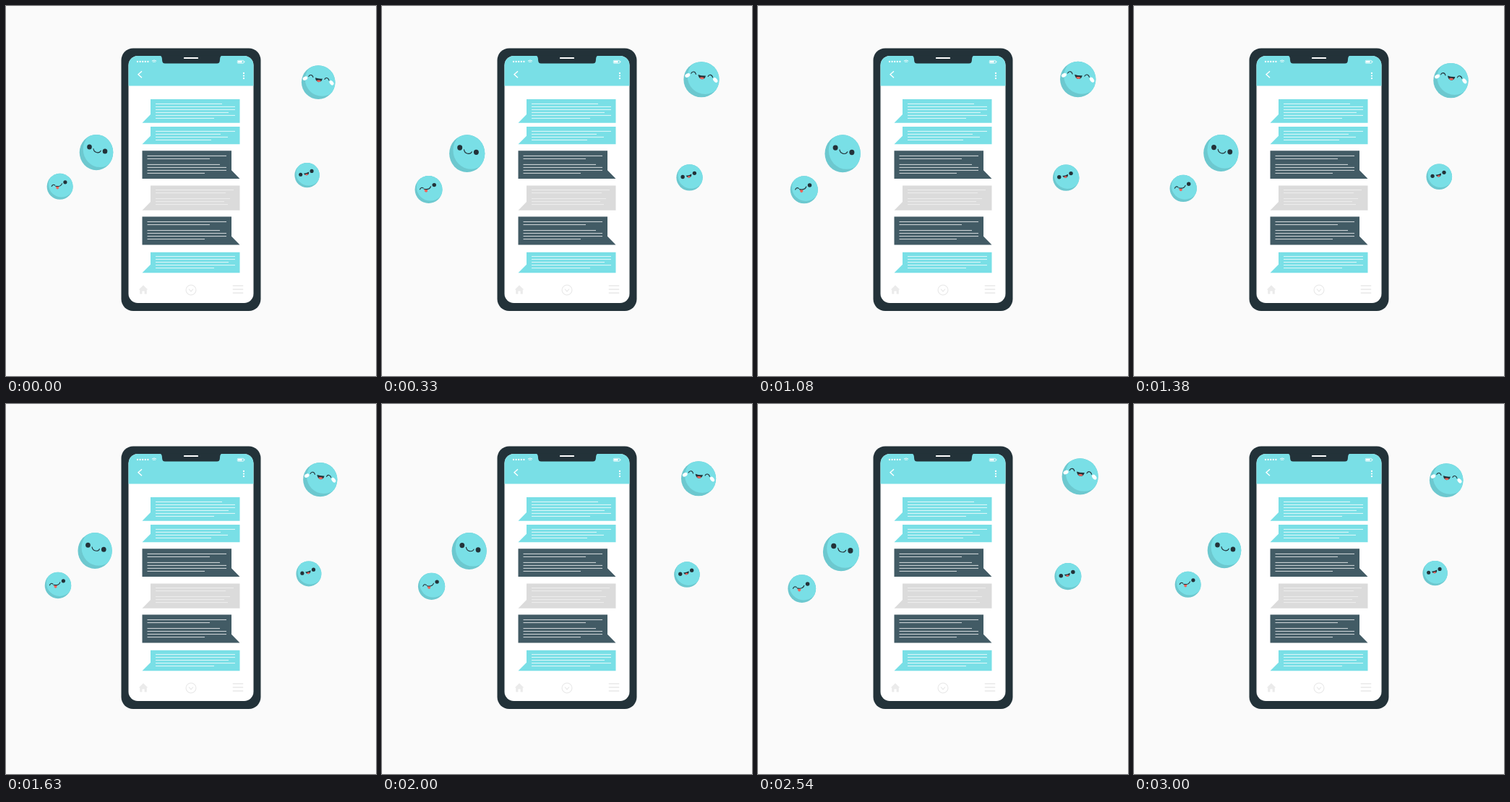
Recreate the animation shown at these times as an HTML page. Size 512 by 512 pixels, loop 3040 ms.

```html
<!DOCTYPE html>
<html lang="en">
<head>
<meta charset="utf-8">
<title>Chat reactions</title>
<style>
  html, body { margin: 0; width: 100%; height: 100%; overflow: hidden; background: #fafafa; }
  svg { display: block; width: 100vw; height: 100vh; }
  .cyan { fill: #79dfe6; }
  .shade { fill: #6cc8cf; }
  .dark { fill: #233239; }
  .slate { fill: #425b65; }
  .gray { fill: #dbdbdb; }
  .white { fill: #fff; }
  .red { fill: #f0655c; }
  .pen { fill: none; stroke: #233239; stroke-width: 1.05; stroke-linecap: round; }
  .icon { fill: none; stroke: #ebebeb; stroke-width: 1.3; }
</style>
</head>
<body>
<svg viewBox="0 0 512 512">
  <defs><clipPath id="screen"><rect x="169.5" y="69" width="173" height="342" rx="13"/></clipPath></defs>
  <rect class="dark" x="159.5" y="58.5" width="193" height="363.5" rx="16.5"/>
  <g clip-path="url(#screen)">
    <rect class="white" x="169" y="69" width="174" height="342"/>
    <rect class="cyan" x="169" y="69" width="174" height="41.5"/>
  </g>
  <path class="dark" d="M213 68.5Q215.6 69 215.8 72L216.2 76Q216.6 79.6 220 79.6H292Q295.4 79.6 295.8 76L296.2 72Q296.4 69 299 68.5Z"/>
  <rect class="white" x="246" y="71" width="20" height="2.1" rx=".6"/>
  <g id="dots" class="white"></g>
  <g fill="none" stroke="#fff">
    <path d="M201.9 76.2Q205 73.6 208.1 76.2M203.3 77.6Q205 76.2 206.7 77.6" stroke-width=".9"/>
    <path d="M188 90.2L183 94.7L188 99.2" stroke-width="1.4"/>
    <rect x="320.3" y="75.3" width="8.6" height="4" rx=".8" stroke-width=".7"/>
  </g>
  <path class="white" d="M321 76h5.6v2.6H321zM329.3 76.3h1v2h-1z"/>
  <g id="chat"></g>
  <path d="M190 386.2L196.3 392.4H194.8V398.6H191.6V394.6H188.4V398.6H185.2V392.4H183.7Z" fill="#ebebeb"/>
  <g class="icon">
    <circle cx="256" cy="393" r="6.9"/>
    <path d="M253 391.6L256 395L259 391.6"/>
    <path d="M313.8 387.2H328.2M313.8 392.2H328.2M313.8 397.2H328.2" stroke-width="1.7"/>
  </g>
  <g id="faces">
    <g id="happy">
      <ellipse class="dark" cx="115.5" cy="194.9" rx="3.3" ry="3.5"/>
      <ellipse class="dark" cx="137" cy="200.9" rx="3.3" ry="3.5"/>
      <path class="pen" d="M121 197.6C121.8 203.4 129.3 204.5 131.2 200.3"/>
    </g>
    <g id="wink">
      <circle class="dark" cx="81.9" cy="243.8" r="2.6"/>
      <path class="red" d="M69 249.8L73 249.6Q74 252.6 71.6 253.5Q69.2 253.6 69 249.8Z"/>
      <path class="pen" d="M63.2 249.6Q64.6 246 67.6 248M68.6 249.2Q75.8 250.6 77.4 245.8"/>
    </g>
    <g id="laugh">
      <path class="pen" d="M418.8 97.6C420 94.6 424 94.6 425 98.6M440.9 101.5C442.2 98.3 446.2 99 447 102.8"/>
      <ellipse class="white" cx="414" cy="100.2" rx="3.5" ry="2.4" transform="rotate(-28 414 100.2)"/>
      <ellipse class="white" cx="450.5" cy="106.3" rx="3.7" ry="2.4" transform="rotate(52 450.5 106.3)"/>
      <path class="dark" d="M427.9 99.2Q433 101 437.9 100.6Q437 105.2 432.6 105.2Q428.6 104.4 427.9 99.2Z"/>
      <path class="red" d="M429.6 103Q433 101.6 436 103.6Q434.8 105.3 432.6 105.2Q430.6 104.8 429.6 103Z"/>
    </g>
    <g id="grin">
      <circle class="dark" cx="407.7" cy="233.3" r="2.55"/>
      <circle class="dark" cx="423.1" cy="228.4" r="2.55"/>
      <path class="dark" d="M411.9 231.7Q416 231.5 419.2 229.5Q419.6 233.6 416.2 234.3Q413.4 234.5 411.9 231.7Z"/>
      <path class="red" d="M413.7 233.2Q415.6 231.6 418.3 232.5Q417.6 234 416.2 234.3Q414.6 234.4 413.7 233.2Z"/>
    </g>
  </g>
</svg>
<script>
const NS = 'http://www.w3.org/2000/svg';
const byId = id => document.getElementById(id);

function make(tag, attrs) {
  const node = document.createElementNS(NS, tag);
  for (const key in attrs) node.setAttribute(key, attrs[key]);
  return node;
}
const add = (parent, tag, attrs) => parent.appendChild(make(tag, attrs));

for (let i = 0; i < 5; i++) add(byId('dots'), 'circle', { cx: 182 + i * 3.6, cy: 77, r: 1.15 });
for (let i = 0; i < 3; i++) add(byId('dots'), 'circle', { cx: 329, cy: 93 + i * 3.6, r: 1.15 });

// Text lines are listed by their right end; 0 leaves a gap.
function bubble(style, top, bottom, tail, firstLine, ends) {
  const sent = style === 'slate';
  const d = sent
    ? `M188.5 ${top}H312V${tail}L323.5 ${bottom}H188.5Z`
    : `M200 ${top}H323.5V${bottom}H188.5L200 ${tail}Z`;
  add(byId('chat'), 'path', { class: style, d });
  const lines = ends.map((end, i) => end && `M${sent ? 195.5 : 207} ${firstLine + i * 4}H${end}`);
  add(byId('chat'), 'path', {
    d: lines.filter(Boolean).join(''),
    stroke: style === 'gray' ? '#f3f3f3' : '#fff', 'stroke-width': 1, 'stroke-opacity': .8
  });
}
const sentLines = [305, 282, 0, 296, 305, 305, 275];
bubble('cyan', 129, 161.7, 150, 135.4, [299, 317, 317, 308, 317, 288]);
bubble('cyan', 167, 191.2, 179.8, 173.4, [317, 297, 307, 284]);
bubble('slate', 200.3, 239, 227.3, 207.4, sentLines);
bubble('gray', 248.6, 282.8, 271, 254.6, [315, 304, 0, 310, 302, 307]);
bubble('slate', 291.6, 330.5, 318.8, 298.6, sentLines);
bubble('cyan', 340.8, 369.3, 357.8, 346.6, [317, 317, 308, 317, 288]);

function ball(id, cx, cy, rx, ry, dx, dy) {
  const clip = make('clipPath', { id: id + 'Clip' });
  const shape = { cx, cy, rx, ry };
  add(clip, 'ellipse', shape);
  const lit = make('g', { 'clip-path': `url(#${id}Clip)` });
  add(lit, 'ellipse', { ...shape, cx: cx + dx, cy: cy + dy, class: 'cyan' });
  byId(id).prepend(clip, make('ellipse', { ...shape, class: 'shade' }), lit);
}
ball('happy', 125, 202.6, 23.3, 24.6, 5, -4.2);
ball('wink', 74.6, 249.8, 18, 18, 2.2, -3.2);
ball('laugh', 432.2, 105.6, 23.3, 23.3, 5, -4.2);
ball('grin', 416.6, 234.1, 17.2, 17.2, 2, -2.8);

const LOOP = 3040, BEAT = 3000, STEP = 1000 / 24;
const stops = [[0, 0], [.2, 1], [.6, 0], [.8, 1], [1, 0]];

function pulse(p) {
  const i = Math.max(1, stops.findIndex(([at]) => p <= at));
  const [a, from] = stops[i - 1], [b, to] = stops[i];
  return from + (to - from) * (p - a) / (b - a);
}

function render(ms) {
  // The picture advances at 24 steps per second.
  const t = Math.floor((ms % LOOP + 4) / STEP) * STEP;
  const scale = 1 + .1 * pulse(Math.min(1, t / BEAT));
  byId('faces').setAttribute('transform', `translate(256 175) scale(${scale}) translate(-256 -175)`);
}

const start = performance.now();
function tick() {
  render(performance.now() - start);
  requestAnimationFrame(tick);
}
tick();
</script>
</body>
</html>
```
